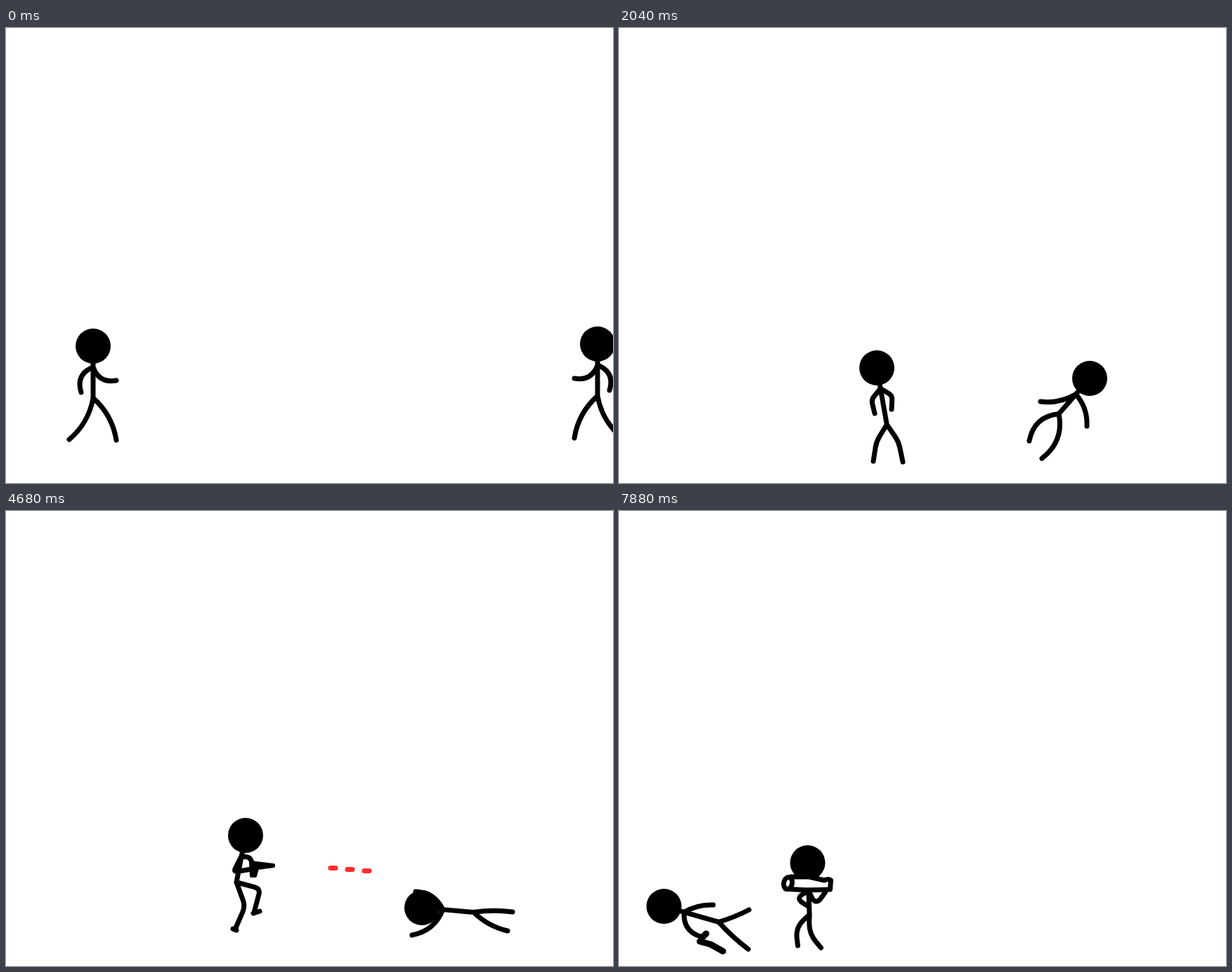
Write an HTML page that moves like this. It is 864 by 648 pixels and loops after 8 s.

```html
<!DOCTYPE html>
<html lang="en">
<head>
<meta charset="utf-8">
<title>Stick fight</title>
<style>
html, body { margin: 0; width: 100%; height: 100%; overflow: hidden; background: #fff; }
svg { display: block; width: 100vw; height: 100vh; }
</style>
</head>
<body>
<svg id="stage" viewBox="0 0 864 648" fill="none" stroke="#000" stroke-width="7" stroke-linecap="round" stroke-linejoin="round"></svg>
<script>
const LOOP = 8000;
const stage = document.getElementById('stage');
const mix = (a, b, k) => a + (b - a) * k;
const mixPoint = (a, b, k) => [mix(a[0], b[0], k), mix(a[1], b[1], k)];
const stroke = (d, style = '') => `<path d="${d}" ${style}/>`;
const shift = (x, y, art) => `<g transform="translate(${x} ${y})">${art}</g>`;

// The joint between two points lies beside their midpoint; bend is its share of the distance.
function joint([x1, y1], [x2, y2], bend) {
  return [(x1 + x2) / 2 - (y2 - y1) * bend, (y1 + y2) / 2 + (x2 - x1) * bend];
}

// round runs from 0 (sharp joint) to 1 (one smooth curve).
function limb(start, middle, end, round) {
  return `M${start}L${mixPoint(middle, start, round)}Q${middle} ${mixPoint(middle, end, round)}L${end}`;
}

// The lean angle sets the spine; hands and feet are [x, y, bend], measured from the head.
function pose({ lean = 0, shoulder = 30, hip = 74, hands, feet, round = 1, extra = '' }) {
  const angle = lean * Math.PI / 180;
  const spine = d => [d * Math.sin(angle), d * Math.cos(angle)];
  const reach = from => ([x, y, bend]) => [joint(from, [x, y], bend), [x, y]];
  const points = [spine(shoulder), spine(hip),
    ...hands.flatMap(reach(spine(shoulder))), ...feet.flatMap(reach(spine(hip)))];
  return { points, round, extra, side: 1 };
}
const flip = p => ({ ...p, points: p.points.map(([x, y]) => [-x, y]), side: -p.side });

const bazooka =
  stroke('M-24 20H2L24 25Q30 22 33 25L32 38Q0 40 -31 37', 'fill="#fff"') +
  '<ellipse cx="-28" cy="29" rx="6" ry="8.5" transform="rotate(12 -28 29)" fill="#fff"/>';
const blade = stroke('M18 -8Q42 -28 70 -29T96 -26Q56 -14 40 2Q26 19 18 20L-8 26M30 -7L44 -14');
const pistol = stroke('M7 38L40 42V44L17 47L14 58H8Z', 'fill="#000" stroke-width="4"');
const droppedPistol = stroke('M51 50L66 54L84 64M56 43L60 39', 'stroke-width="9"');

const arms = [[-17, 66, .46], [33, 49, .42]];
const legs = [[-34, 133, -.18], [33, 134, -.18]];
const walk = pose({ hands: arms, feet: legs });
const stride = pose({ hands: arms, feet: [...legs].reverse() });
const kick = pose({
  lean: 10.5, shoulder: 38, hands: [[-1, 64, .55], [36, 43, .6]], feet: [[2, 140, -.19], [54, 50, .25]],
  extra: stroke('M54 50Q59 47 64 51L74 51M70 48L75 53')
});
const hit = pose({ lean: -24, hands: [[-49, 34, -.48], [-9, 68, -.36]], feet: [[-81, 112, .2], [-18, 137, .16]] });
const stand = pose({
  lean: 10, hip: 82, round: .3, hands: [[-3, 65, .25], [21, 59, -.3]], feet: [[-5, 133, .1], [37, 134, -.1]]
});
const fall = pose({ lean: -41, hip: 67, hands: [[-70, 33, -.17], [-4, 68, -.2]], feet: [[-86, 89, .37], [-68, 114, -.31]] });
const prone = pose({
  lean: 98, round: .2, hands: [[28, -34, -.2], [52, 7, .55]], feet: [[107, -27, -.5], [125, 13, -.2]]
});
const armed = pose({
  lean: -1.5, shoulder: 50, round: .2, hands: [[-8, 25, -.7], [4, 69, -1.3]], feet: [[-14, 138, .1], [18, 139, 0]],
  extra: blade + stroke('M-14 138L-20 140M18 139L13 141')
});
const shoot = pose({
  lean: -11, hip: 68, round: .25, hands: [[8, 48, 1], [11, 42, -.25]], feet: [[-15, 134, -.2], [12, 110, -.5]],
  extra: pistol + stroke('M-18 133L-13 135M11 111L20 108')
});
const down = pose({ lean: 85, hands: [[-9, -23, .3], [-14, 39, -.28]], feet: [[129, 6, -.07], [122, 33, .14]] });
const beaten = pose({
  lean: 74, hip: 81, hands: [[70, -2, -.15], [52, 43, .4]], feet: [[121, 5, .05], [120, 61, .05]], extra: droppedPistol
});
const aim = { lean: 2, shoulder: 40, round: .6, hands: [[1, 62, .85], [25, 42, .85]] };
const aimPass = pose({ ...aim, round: .3, feet: [[14, 112, .6], [7, 125, 0]], extra: bazooka + stroke('M2 125H9') });
const aimOpen = pose({ ...aim, feet: [[-14, 118, .26], [19, 121, .19]], extra: bazooka });

// hop is the height of the arc that leads to this key.
const key = (t, p, x, y, hop = 0) => ({ t, p, x, y, hop });
function march(start, end, count, from, to, poses) {
  return Array.from({ length: count + 1 }, (_, i) => {
    const k = i / count;
    return key(mix(start, end, k), poses[i % 2], ...mixPoint(from, to, k));
  });
}

const left = [
  ...march(120, 720, 6, [124, 453], [372, 450], [walk, stride]),
  key(880, kick, 391, 449), key(1320, stand, 382, 465), key(2040, stand, 367, 484),
  key(2640, stand, 342, 484), key(3000, prone, 208, 596), key(3240, prone, 208, 596),
  key(3600, shoot, 341, 462), key(5720, shoot, 341, 462), key(6080, beaten, 64, 563, 60)
];
const right = [
  ...march(120, 520, 4, [842, 450], [660, 450], [flip(walk), flip(stride)]),
  key(880, hit, 557, 431, 130), key(1680, fall, 700, 264), key(2040, fall, 670, 499),
  key(2280, flip(stand), 635, 470), key(2720, flip(kick), 490, 420, 160),
  key(2880, armed, 475, 462), key(3840, armed, 475, 462),
  key(4440, down, 580, 565), key(4680, down, 592, 565), key(4920, down, 592, 565),
  key(5400, flip(stand), 655, 476), key(5560, aimPass, 655, 470),
  ...march(6200, 7880, 7, [655, 470], [268.5, 501], [aimPass, aimOpen])
];

// Quick drawings during the charge, then one every 120 ms.
function tick(t) {
  if (t < 120) return 0;
  if (t < 960) return Math.min(880, 120 + Math.floor((t - 120) / 54.3) * 54.3);
  const offset = t < 5480 ? 0 : 80;
  return Math.floor((t - offset) / 120) * 120 + offset;
}

function sample(keys, t) {
  const next = keys.findIndex(k => k.t > t);
  const b = next < 0 ? keys[keys.length - 1] : keys[next];
  const a = next < 0 ? b : keys[Math.max(0, next - 1)];
  const k = a === b ? 0 : (t - a.t) / (b.t - a.t);
  return {
    x: mix(a.x, b.x, k),
    y: mix(a.y, b.y, k) - b.hop * 4 * k * (1 - k),
    points: a.p.points.map((p, i) => mixPoint(p, b.p.points[i], k)),
    round: mix(a.p.round, b.p.round, k),
    extra: a.p.extra, side: a.p.side
  };
}

function figure({ x, y, points, round, extra, side }) {
  const [neck, hip, ...limbs] = points;
  let body = `M0 0L${neck}L${hip}`;
  for (let i = 0; i < 4; i++) {
    body += limb(i < 2 ? neck : hip, limbs[2 * i], limbs[2 * i + 1], round);
  }
  return shift(x, y, '<circle r="25" fill="#000" stroke="none"/>' + stroke(body) +
    `<g transform="scale(${side} 1)">${extra}</g>`);
}

const yellow = 'stroke="#ffff20" stroke-width="2.6"';
const arc = (start, end, bend) => limb(start, joint(start, end, bend), end, .4);
const aura = stroke(
  arc([-15, -25], [5, -4], .45) + arc([26, -25], [4, 6], -.75) + arc([-61, 26], [-21, 48], .35) +
  arc([16, 45], [0, 73], -.35) + arc([-68, 113], [-46, 99], -.2) + arc([-35, 99], [-25, 138], .2), yellow);
const zigzag = Array.from({ length: 7 }, (_, i) => [475 + i + (i % 2 ? 9 : -9), 481 + i * 6.5]);
const burst = stroke('M' + zigzag.join('L'), yellow);

function effects(t, foe) {
  let art = '';
  if (t >= 850 && t < 1300) art += shift(foe.x, foe.y, aura);
  if (t >= 850 && t < 1000) art += burst;
  if (t >= 3000 && t < 3240) {
    const back = t < 3120 ? -22 : 0;
    art += shift(back, back * 2, stroke('M-2 226Q8 248 14 260Q28 288 33 295L52 320'));
  }
  if (t >= 3720 && t < 5040) {
    const flight = (t % 360) / 120 * 65 - 65 * (4680 % 360) / 120;
    for (let i = 0; i < 3; i++) art += shift(flight + 462 + 24 * i, 508.5 + 2 * i, stroke('M0 0H7', 'stroke="#ff2e2e"'));
  }
  if (t >= 5560 && t < 5840) art += stroke(`M${t < 5720 ? 585 : 410} 500h18`);
  return art;
}

function draw(now) {
  const t = tick(now % LOOP);
  const hero = sample(left, t);
  const foe = sample(right, t);
  if (t > 3720 && t < 5640) hero.y -= 9 * Math.sin((t - 3720) / 480 * Math.PI) ** 2;
  stage.innerHTML = figure(hero) + figure(foe) + effects(t, foe);
}

const begin = performance.now();
function loop() {
  draw(performance.now() - begin);
  requestAnimationFrame(loop);
}
loop();
</script>
</body>
</html>
```
